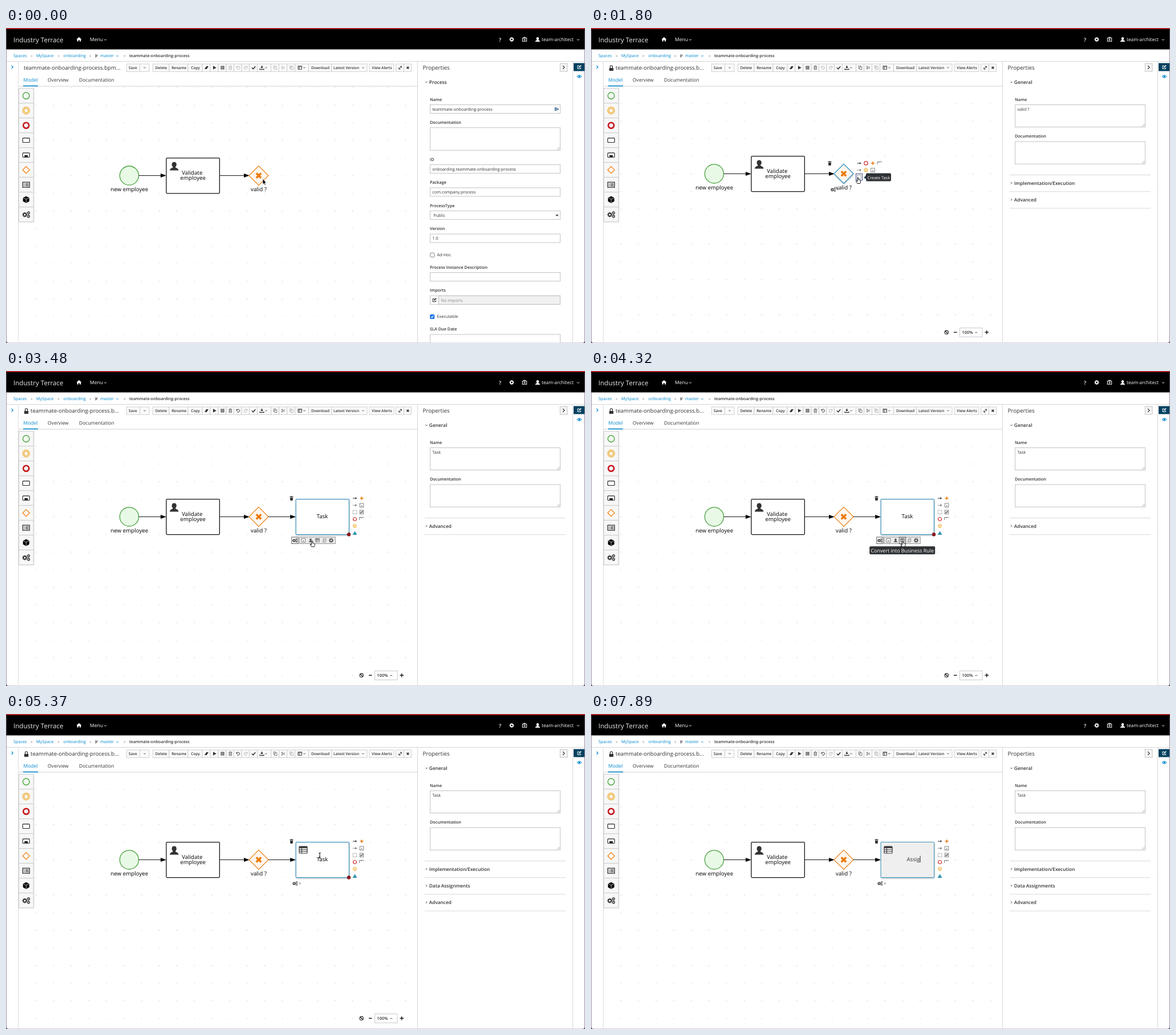
Recreate the animation shown at these times as an HTML page. Size 1015x552 px, loop 8 s.

```html
<!DOCTYPE html>
<html lang="en">
<head>
<meta charset="utf-8">
<title>Process editor</title>
<style>
html, body { margin: 0; width: 100%; height: 100%; overflow: hidden; background: #fff; }
svg { display: block; width: 1015px; height: 552px; font-family: "Open Sans", sans-serif; text-rendering: geometricPrecision; }
</style>
</head>
<body>
<svg id="stage" viewBox="0 0 1015 552" xmlns="http://www.w3.org/2000/svg"></svg>
<script>
const INK = '#333', BLUE = '#0088ce', GREY = '#b5b5b5', ORANGE = '#ec7a08', RED = '#cc2b2b', GOLD = '#eda51c';

// Markup helpers
const text = (x, y, s, size, fill = INK, more = '') =>
  `<text x="${x}" y="${y}" font-size="${size}" fill="${fill}" ${more}>${s}</text>`;
const bold = (x, y, s, size = 7.3, fill = INK, more = '') => text(x, y, s, size, fill, 'font-weight="600" ' + more);
const mid = (x, y, s, size, fill, more = '') => text(x, y, s, size, fill, 'text-anchor="middle" ' + more);
const rect = (x, y, w, h, fill = '#fff', stroke = 'none', more = '') =>
  `<rect x="${x}" y="${y}" width="${w}" height="${h}" fill="${fill}" stroke="${stroke}" ${more}/>`;
const fillPath = (d, fill = INK, more = '') => `<path d="${d}" fill="${fill}" ${more}/>`;
const line = (d, stroke = INK, w = 1, more = '') => `<path d="${d}" fill="none" stroke="${stroke}" stroke-width="${w}" ${more}/>`;
const ring = (x, y, r, stroke, w = 1, fill = 'none') =>
  `<circle cx="${x}" cy="${y}" r="${r}" fill="${fill}" stroke="${stroke}" stroke-width="${w}"/>`;
const group = (id, body, more = '') => `<g id="${id}" ${more}>${body}</g>`;
const at = (x, y, body, scale = 1) => `<g transform="translate(${x} ${y}) scale(${scale})">${body}</g>`;
const chevron = (x, y, dir, color = INK, s = 2, w = 1) => {
  const turn = { right: 0, down: 90, left: 180, up: -90 }[dir];
  return `<path transform="translate(${x} ${y}) rotate(${turn})" d="M${-s / 2} ${-s}L${s / 2} 0L${-s / 2} ${s}" fill="none" stroke="${color}" stroke-width="${w}"/>`;
};

// Icons, centred on 0,0
const gear = c => ring(0, 0, 2.3, c, 1.6) + line('M0-4V-2.6M0 2.6V4M-4 0H-2.6M2.6 0H4M-2.8-2.8L-1.9-1.9M1.9 1.9L2.8 2.8M-2.8 2.8L-1.9 1.9M1.9-1.9L2.8-2.8', c, 1.5);
const gears = c => at(-1.6, 0.3, gear(c), 0.72) + at(2.8, -1.8, gear(c), 0.48) + at(2.8, 2.2, gear(c), 0.48);
const person = c => fillPath('M0-4C3-4 2.6 0 1.1 .8C1.2 1.8 4 1.6 4.2 4H-4.2C-4 1.6-1.2 1.8-1.1 .8C-2.6 0-3-4 0-4Z', c);
const trash = c => fillPath('M-3.2-2H3.2V-3H1.2L.8-4H-.8L-1.2-3H-3.2ZM-2.6-1.3H2.6L2.2 4H-2.2Z', c);
const trashOutline = c => line('M-3-2.2H3M-1-2.4V-3.4H1V-2.4M-2.2-2V3.3H2.2V-2M-.7-.8V2M.7-.8V2', c, .8);
const grid = c => fillPath('M-3-3h1.7v1.7h-1.7zm2.2 0h1.7v1.7h-1.7zm2.2 0h1.7v1.7h-1.7zM-3-.8h1.7v1.7h-1.7zm2.2 0h1.7v1.7h-1.7zm2.2 0h1.7v1.7h-1.7zM-3 1.4h1.7v1.7h-1.7zm2.2 0h1.7v1.7h-1.7zm2.2 0h1.7v1.7h-1.7z', c);
const undo = c => line('M-2-1.2A2.6 2.6 0 1 1-1.6 2', c, 1) + fillPath('M-3.2-3V0H-.3Z', c);
const sheets = c => rect(-2.9, -3, 3.8, 4.4, 'none', c, 'stroke-width=".8"') + rect(-.9, -1.2, 3.8, 4.4, '#fff', c, 'stroke-width=".8"');
const scissors = c => line('M-1.2-1.2L3 2M-1.2 1.2L3-2', c, .9) + ring(-2, -1.8, 1, c, .8) + ring(-2, 1.8, 1, c, .8);
const pencilBox = c => line('M2.5 .6V3H-3V-2.4H.4', c, 1) + line('M-1 1L3.2-3', c, 1.7);
const flow = (c, dash = '') => line('M-3.5 0H2', c, 1.1, dash) + fillPath('M1-2.1L3.8 0L1 2.1Z', c);
const plus = c => line('M-3 0H3M0-3V3', c, 1.5);
const note = () => line('M-4 3V-1.5H4M-1-1.5V.3', '#68737c', .9);
const box = (c, inner = '') => rect(-3.3, -3.3, 6.6, 6.6, '#fff', c, 'stroke-width=".8"') + inner;
const dotBox = () => box('#666', rect(-.8, .2, 1.6, 1.6, '#555'));
const table = c => rect(-7, -6, 14, 12, '#fff', c, 'stroke-width="1.2" rx="1"') + line('M-7-3.2H7M-7-.2H7M-7 2.8H7M-2.6-6V6', c, 1.1) + rect(-7, -6, 14, 2.4, c);
const home = c => fillPath('M0-4L4.6 0H3.2V3.6H1V1H-1V3.6H-3.2V0H-4.6Z', c);
const kit = c => rect(-3.7, -2.3, 7.4, 5.6, 'none', c, 'stroke-width="1"') + line('M-1.5-2.6V-3.8H1.5V-2.6', c, 1) + ring(0, .5, 1.2, c, 1);

function header() {
  const crumbs = [[13, 'Spaces'], [53, 'MySpace'], [100.5, 'onboarding'], [165, 'master']];
  return rect(0, 0, 1015, 552, '#5d4763') + rect(.6, 1, 1013.8, 550.8, '#fff', 'none', 'rx="4"') +
    rect(.6, 1, 1013.8, 36.5, '#000') + rect(0, 0, 1015, 1.8, '#c0282e') +
    text(13, 24.5, 'Industry Terrace', 11.6, '#e8e8e8') +
    at(128, 20, home('#fff')) + text(147, 23, 'Menu', 8.5, '#fff') + chevron(174, 20.5, 'down', '#fff') +
    bold(864, 23.5, '?', 9, '#fff') + at(886.5, 20, gear('#fff')) + at(909, 20, kit('#fff')) +
    at(932, 20, person('#fff')) + text(939, 23, 'team-architect', 8.3, '#fff') + chevron(1003, 20.5, 'down', '#fff') +
    crumbs.map(([x, s]) => text(x, 51.3, s, 7.3, BLUE)).join('') +
    [43, 90, 146, 206].map(x => text(x, 51.3, '»', 7.3, '#888')).join('') +
    line('M157.5 46V51.5M160 46.5V48Q160 49 157.5 50', INK, 1) + chevron(195, 49, 'down', BLUE, 1.8, .9) +
    bold(216, 51.3, 'teammate-onboarding-process', 7.1) +
    line('M1 58.5H1014M721.5 58.5V552M993.5 58.5V552', '#d6d6d6', 1) + line('M21.5 58.5V552', '#dedede', 1) +
    chevron(11, 68.5, 'right', BLUE, 2.6, 1.2) +
    rect(995, 61.5, 19, 14, '#00405f') + at(1005, 68.5, pencilBox('#fff')) +
    line('M1001 85Q1005 80.5 1009 85Q1005 89.5 1001 85Z', BLUE, 1) + ring(1005, 85, 1.2, BLUE, 1, BLUE);
}

function toolbar() {
  const cells = [[212, 23], [235, 16.5], [258, 28.5], [286.5, 33], [319.5, 25], [344.5, 14], [358.5, 14], [372.5, 14],
    [386.5, 13.5], [400, 13.5], [413.5, 13.5], [427, 14], [441, 24], [465, 14], [479, 14], [493, 14], [507, 24],
    [531, 40], [571, 62.5], [637.5, 43], [684, 14], [698, 13]];
  const words = [[222.5, 'Save'], [272, 'Delete'], [303.2, 'Rename'], [332, 'Copy'], [551, 'Download'], [596.5, 'Latest Version'], [659, 'View Alerts']];
  return cells.map(([x, w]) => rect(x - .5, 63, w, 13.3, '#fafafa', '#c6c6c6', 'stroke-width=".8"')).join('') +
    words.map(([x, s]) => mid(x, 72.1, s, 6.6, INK, 'font-weight="600"')).join('') +
    [243, 456, 523, 626].map(x => chevron(x, 69.5, 'down', INK, 1.6, .9)).join('') +
    at(351.5, 69.5, fillPath('M-3.5 2.5L-.3-2.5H3.5L.3 2.5Z')) + fillPath('M363 66.3L368.8 69.5L363 72.7Z') +
    at(379.5, 69.5, grid(INK)) +
    group('offTrash', at(393.3, 69.5, trashOutline(GREY))) + group('onTrash', at(393.3, 69.5, trashOutline('#555'))) +
    group('offUndo', at(406.7, 69.5, undo(GREY))) + group('onUndo', at(406.7, 69.5, undo(INK))) +
    `<g transform="translate(420.3 69.5) scale(-1 1)">${undo(GREY)}</g>` +
    line('M431 69.5L433.3 71.8L437.3 67.2', INK, 1.5) +
    line('M445 71V72.7H452V71', INK, 1.2) + fillPath('M447.7 66H449.3V68.3H451L448.5 71L446 68.3H447.7Z') +
    group('offCopy', at(472, 69.5, sheets(GREY)) + at(486, 69.5, scissors(GREY))) +
    group('onCopy', at(472, 69.5, sheets('#666')) + at(486, 69.5, scissors('#666'))) +
    at(500.3, 69.5, sheets('#aaa')) +
    rect(512, 66.7, 6.5, 5.6, 'none', INK, 'stroke-width=".9"') + line('M512 68H518.5M514.2 68V72.3', INK, .8) +
    line('M689 71.8L693.2 67.4M690.7 67.2H693.4V69.9M688.8 69.3V72H691.5', INK, 1) +
    line('M702.5 67.7L706.3 71.5M706.3 67.7L702.5 71.5', INK, 1.6);
}

function tabs() {
  const file = 'teammate-onboarding-process';
  return group('plainTitle', text(31, 73, file + '.bpm...', 9.6)) +
    group('lockTitle', rect(32, 70, 7.3, 5, INK, 'none', 'rx=".6"') + line('M33.6 70V68A2 2 0 0 1 37.7 68V70', INK, 1.2) + text(43, 73, file + '.b...', 9.6)) +
    line('M22 102H721', '#d1d1d1', 1) + rect(30, 100.7, 26, 1.6, BLUE) +
    text(30.5, 94.2, 'Model', 8.5, BLUE) + text(73, 94.2, 'Overview', 8.5) + text(128, 94.2, 'Documentation', 8.5);
}

function palette() {
  const c = '#222';
  const icons = [
    ring(0, 0, 5.8, '#3f9c35', 1.3, '#f0faee'),
    ring(0, 0, 6, GOLD, 1.2) + ring(0, 0, 3.7, GOLD, 1.2),
    ring(0, 0, 5, '#c4161c', 2.6),
    rect(-6, -3.8, 12, 7.6, '#fff', c, 'stroke-width="1.1" rx="1"'),
    rect(-6, -3.8, 12, 7.6, '#fff', c, 'stroke-width="1.1" rx="1"') + rect(-3, 0, 6, 3.2, c),
    fillPath('M0-6L6 0L0 6L-6 0Z', '#fff8ef', `stroke="${ORANGE}" stroke-width="1.2"`),
    rect(-6, -4.5, 12, 9, '#fff', c, 'stroke-width="1.2"') + line('M-4.3-2H-2.7M-1.4-2H4.4M-4.3 0H-2.7M-1.4 0H4.4M-4.3 2H-2.7M-1.4 2H4.4', c, 1.1),
    fillPath('M0-6L5.5-3.3V3L0 6L-5.5 3V-3.3Z', '#000') + line('M-5-3L0-.6L5-3M0-.6V5.5', '#fff', .7),
    at(0, 0, gears(INK), 1.5)
  ];
  return rect(22, 105.5, 27.5, 235, '#000', 'none', 'opacity=".12" rx="1"') + icons.map((icon, i) =>
    rect(22.5, 105.7 + 26 * i, 25.7, 26, '#f7f7f7', '#c9c9c9', 'stroke-width=".9"') + at(35.3, 118.7 + 26 * i, icon)).join('');
}

const arrow = (x1, x2) => line(`M${x1} 255.4H${x2 - 9}`, '#111', 1) + fillPath(`M${x2 - 10} 251.9L${x2} 255.4L${x2 - 10} 258.9Z`, '#000');
const label = (x, y, s) => mid(x, y, s, 9.75, '#000');
const gateway = (stroke, w) => fillPath('M443 238.4L460 255.4L443 272.4L426 255.4Z', '#fef6ee', `stroke="${stroke}" stroke-width="${w}" stroke-linejoin="round"`);
const tip = (x, y, w, h) => rect(x, y, w, h, '#2f3235', 'none', 'rx="2"');

function diagram() {
  let dots = '';
  for (let j = 0; j < 15; j++) for (let i = 0; i < 22; i++)
    dots += `M${(52 + 30.85 * i).toFixed(1)} ${(101.3 + 30.87 * j).toFixed(1)}h1.1`;
  const nodes =
    ring(216, 255.4, 16.6, '#4aa03f', 1.3, '#e8fae6') + label(216.3, 283, 'new employee') +
    arrow(232.8, 281) + rect(281, 224.6, 93.4, 62, '#fff', '#111', 'rx="1.5" stroke-width="1.3"') +
    at(294.8, 239, person(INK), 1.85) + label(326.3, 253.8, 'Validate') + label(327.8, 262.6, 'employee') +
    arrow(374.5, 427) + group('gateIdle', gateway(ORANGE, 1.2)) +
    group('gateSel', gateway('#1f87c0', 1.2), 'filter="url(#glow)"') +
    line('M438.8 251.2L447.2 259.6M447.2 251.2L438.8 259.6', ORANGE, 3.5) + label(443, 283, 'valid ?');
  const dash = 'stroke-dasharray="1.5 .8"';
  const gateTools = at(418.5, 237, trash(INK)) + at(424.5, 283, gears(INK)) + chevron(433, 282.5, 'right', INK, 1.6, 1) +
    at(470, 237, flow(INK)) + at(482, 237, ring(0, 0, 3.2, RED, 1.2)) + at(494, 237, plus(ORANGE)) + at(506, 236, note()) +
    at(470, 249, flow('#666', dash)) + at(482, 249, ring(0, 0, 3.2, GOLD, 1) + ring(0, 0, 1.5, GOLD, .7)) + at(494, 249, dotBox()) +
    at(470, 261, box('#888')) + fillPath('M482 257.6L485.6 264H478.4Z', '#2f8fae');
  const taskTools = at(500.5, 223, trash(INK)) +
    at(611.5, 223, flow(INK)) + at(623.5, 223, plus(ORANGE)) + at(611.5, 235.3, flow('#666', dash)) + at(623.5, 235.3, dotBox()) +
    at(611.5, 247.3, box('#aaa')) + at(623.5, 247.3, box('#666', line('M-2 2L2-2M-2 0H2', '#555', 1.2))) +
    at(611.5, 259.5, ring(0, 0, 3, RED, 1.2)) + at(623.5, 258, note()) +
    at(611.5, 271.6, ring(0, 0, 3, GOLD, 1) + ring(0, 0, 1.3, GOLD, .7)) + fillPath('M611.5 280.4L615.4 287H607.6Z', '#2f93ae') +
    group('taskGears', at(506.7, 296.8, gears(INK)) + chevron(515.3, 296.8, 'right', INK, 1.6, 1));
  const bar = rect(500.7, 291, 11.6, 11.6, '#f7f7f7', '#555', 'stroke-width=".9"') + at(506.5, 296.8, gears(INK)) +
    rect(514.3, 291, 63, 11.6, '#ececec', '#888', 'stroke-width=".9"') +
    at(521.5, 296.8, dotBox()) + at(534, 296.8, person('#555'), .8) + at(546, 296.8, table('#555'), .5) +
    at(558, 296.8, line('M-2.5 3H2L3-3H-1.5Z', '#888', .9) + line('M-1-1H1.5M-1.5 1H1', '#888', .7)) + at(570, 296.8, gear('#555')) +
    group('ruleFocus', rect(540.3, 291.3, 11.4, 11, 'none', '#444', 'stroke-width=".9"'));
  const frame = more => rect(508.2, 224.6, 93.2, 62, '#fff', '#3f95bd', `rx="1.5" stroke-width="1.2" ${more}`);
  const task = arrow(460, 508.2) + frame('filter="url(#glow)"') +
    group('ruleIcon', at(521, 238, table(INK))) + group('taskLabel', label(554.5, 258.3, 'Task')) +
    group('handle', ring(601, 286.4, 3, '#6d1418', .6, '#93181e')) + taskTools +
    group('editor', rect(508.8, 225.2, 92, 60.8, '#efefef') + at(521, 238, table(INK)) +
      line('M514.7 255.6h1.1M545.5 255.6h1.1M576.4 255.6h1.1', '#c4c4c4', 1) +
      group('marked', rect(555, 248, 20.3, 12.3, '#a9cdf0')) + `<text id="typed" x="565" y="257.8" font-size="9.7" fill="${INK}" text-anchor="middle"></text>` +
      group('caret', rect(576.7, 248.5, .8, 11.6, '#000')));
  return group('canvas', line(dots, '#bdbdbd', 1.1) + nodes) + group('task', task) + group('gateTools', gateTools) +
    group('createTip', rect(464.4, 255.4, 11.4, 11.4, 'none', '#39508c', 'stroke-width="1"') + fillPath('M478.5 261.5L483 258.5V264.5Z', '#2f3235') +
      tip(482, 254.6, 44, 14) + mid(504.3, 264.6, 'Create Task', 7.4, '#fff', 'font-weight="500"')) +
    group('bar', bar) + group('ruleTip', fillPath('M546 303.5L550 308H542Z', '#2f3235') +
      tip(488.2, 307.3, 115, 14) + mid(545.7, 317.5, 'Convert into Business Rule', 8.9, '#fff'));
}

const zoom = () => rect(615, 525, 88, 17.5) + ring(623.2, 533.3, 3.2, '#222', 1.1) + line('M621.2 531.3L625.2 535.3M636 533.3H641.5M690.5 533.3H697M693.7 530V536.6', '#222', 1.5) +
  rect(646.5, 525.6, 39.5, 15.6, '#fff', '#c4c4c4', 'stroke-width=".9"') + bold(650.3, 536, '100%', 7.4) + chevron(675.3, 533.7, 'up', INK, 1.7, 1);

// Properties panel
const field = (y, s, h = 15) => rect(743.5, y, 228, h, '#fff', '#bcbcbc', 'stroke-width=".9"') + text(747.3, y + 10.4, s, 7.3) +
  (h > 20 ? line(`M966 ${y + h - 1}l4.5-4.5M968.5 ${y + h - 1}l2-2`, '#888', .7) : '');
const section = (y, s) => chevron(737, y - 3, 'right', INK, 1.7, .9) + bold(741.8, y, s, 8.25) + line(`M734 ${y + 12}H981`, '#d8d8d8', 1);
const opened = s => chevron(737, 95, 'down', INK, 1.7, .9) + bold(741.8, 97.9, s, 8.4);
const check = (y, s, on) => rect(743.7, y - 3.6, 7.2, 7.2, on ? '#1a73e8' : '#fff', on ? '#1a73e8' : '#777', 'rx="1" stroke-width=".9"') +
  (on ? line(`M745.2 ${y}l1.5 1.7l2.8-3.5`, '#fff', 1.2) : '') + text(755.5, y + 2.6, s, 7.3);

function processForm() {
  const labels = [[127.6, 'Name'], [168, 'Documentation'], [232.6, 'ID'], [273, 'Package'], [313.5, 'ProcessType'], [354, 'Version'],
    [421.6, 'Process Instance Description'], [462.2, 'Imports'], [529.5, 'SLA Due Date']];
  return opened('Process') + labels.map(([y, s]) => bold(743, y, s)).join('') +
    field(134.5, 'teammate-onboarding-process') + line('M962.7 138.7V145.6M965 139.2V145', '#1d4e7a', 1.3) + line('M967.5 140.5V143.8', '#1d4e7a', 1.6) +
    field(174.7, '', 39.6) + field(239.6, 'onboarding.teammate-onboarding-process') + field(280, 'com.company.process') +
    field(320.4, '') + text(749.5, 330.8, 'Public', 7.3) + chevron(966, 328, 'down', '#222', 2, 1.3) + field(361, '1.0') +
    check(397.8, 'Ad-Hoc', false) + field(428.6, '') + field(469.2, '') + rect(758.5, 469.2, 213, 15, '#f1f1f1', '#bcbcbc', 'stroke-width=".9"') +
    at(751, 476.7, pencilBox(INK)) + text(762.5, 479.5, 'No imports', 7.3, '#888') + check(505.8, 'Executable', true) + field(537, '');
}

const nodeForm = (name, sections) => opened('General') + bold(743, 127.6, 'Name') + field(134.5, name, 39) + bold(743, 192, 'Documentation') +
  field(199, '', 39.3) + line('M734 257.5H981', '#d8d8d8', 1) + sections.map((s, i) => section(274.7 + 29.2 * i, s)).join('');

const panel = () => text(730.5, 73, 'Properties', 9.8) + rect(971.3, 62.5, 12.6, 13.5, '#f7f7f7', '#bbb', 'stroke-width=".9"') + chevron(977.6, 69, 'right', INK, 3, 1.1) +
  group('processForm', processForm()) + group('gateForm', nodeForm('valid ?', ['Implementation/Execution', 'Advanced'])) +
  group('taskForm', nodeForm('Task', ['Advanced'])) + group('ruleForm', nodeForm('Task', ['Implementation/Execution', 'Data Assignments', 'Advanced']));

// Pointers have their hot spot on 0,0
const pointers = () => group('pointer',
  group('arrow', fillPath('M0-1V9.2L2.2 7.2L3.8 10.6L5.3 9.9L3.8 6.6H6.6Z', '#000', 'stroke="#fff" stroke-width=".8"')) +
  group('hand', fillPath('M-.9 0Q0-1 .9 0V3.5Q3.8 3.3 4.6 5V7.5L3.5 10H-1L-3.6 6Q-3.3 4.8-.9 6.3Z', '#fff', 'stroke="#000" stroke-width=".9"')) +
  group('move', line('M-4 0H4M0-4V4', '#fff', 3) + line('M-3.5 0H3.5M0-3.5V3.5M-1.2-2.5H1.2M-1.2 2.5H1.2M-2.5-1.2V1.2M2.5-1.2V1.2', '#000', 1.3)) +
  group('beam', line('M-1.9-4.9Q0-4.7 0-3.2Q0-4.7 1.9-4.9M0-4V4.2M-1.9 5Q0 4.8 0 3.3Q0 4.8 1.9 5M-1 1.6H1', '#111', 1)));

const stage = document.getElementById('stage');
stage.innerHTML = '<defs><filter id="glow" x="-20%" y="-20%" width="140%" height="150%"><feDropShadow dx=".5" dy="1.2" stdDeviation=".9" flood-color="#000" flood-opacity=".26"/></filter>' +
  '<clipPath id="area"><rect x="22" y="102.6" width="699" height="449"/></clipPath></defs>' +
  header() + toolbar() + `<g clip-path="url(#area)">${diagram()}${group('zoom', zoom())}</g>` + tabs() + palette() + panel() + pointers();

const el = Object.fromEntries([...stage.querySelectorAll('[id]')].map(n => [n.id, n]));
const show = (id, on) => el[id].setAttribute('opacity', +on);
const fade = (t, a, b) => Math.min(1, Math.max(0, (t - a) / (b - a)));
const ease = p => p * p * (3 - 2 * p);

const route = [[0, 450, 265], [1560, 450, 265], [1770, 468, 262.5], [2370, 468, 262.5], [2850, 525, 287], [3120, 508, 298],
  [3240, 508, 298], [3600, 546.5, 298], [4560, 546.5, 298], [5160, 550, 248]];
const shapes = [[0, 'arrow'], [1680, 'hand'], [2070, 'arrow'], [2580, 'move'], [3030, 'hand'], [4560, 'arrow'], [4950, 'beam'], [7050, '']];
const typing = [[0, 'Task'], [7050, 'A'], [7320, 'As'], [7440, 'Ass'], [7560, 'Assi'], [7830, 'Assig']];
const current = (list, t) => list.filter(k => k[0] <= t).pop()[1];

function place(t) {
  const i = route.findIndex(k => k[0] > t);
  if (i < 0) return route[route.length - 1].slice(1);
  const [t0, x0, y0] = route[i - 1], [t1, x1, y1] = route[i], p = ease(fade(t, t0, t1));
  return [x0 + (x1 - x0) * p, y0 + (y1 - y0) * p];
}

function draw(t) {
  const picked = t >= 720, made = t >= 2010, ruled = t >= 4590, editing = t >= 5520, typed = t >= 7050;
  const gateSel = picked && !made, barOpen = t >= 3150 && t < 4560;
  el.canvas.setAttribute('transform', `translate(0 ${picked ? 0 : 3.2})`);
  show('plainTitle', t < 1410); show('lockTitle', t >= 1410);
  show('offTrash', !picked); show('onTrash', picked);
  show('offCopy', !picked); show('onCopy', picked);
  show('offUndo', !made); show('onUndo', made);
  show('gateIdle', !gateSel); show('gateSel', gateSel);
  show('gateTools', gateSel ? fade(t, 750, 1020) : 0);
  show('createTip', t >= 1740 && !made);
  show('task', made ? fade(t, 1980, 2130) : 0);
  show('taskGears', !barOpen); show('bar', barOpen ? fade(t, 3150, 3270) : 0);
  show('ruleFocus', t >= 3540); show('ruleTip', t >= 3540 && t < 4560);
  show('ruleIcon', ruled);
  show('taskLabel', !editing); show('handle', !editing);
  show('editor', editing ? fade(t, 5490, 5700) : 0);
  show('marked', t >= 5700 && !typed);
  el.typed.textContent = current(typing, t);
  el.typed.setAttribute('fill', typed ? INK : '#34485c');
  show('caret', typed);
  if (typed) el.caret.setAttribute('transform', `translate(${el.typed.getComputedTextLength() / 2 - 11.6} 0)`);
  show('zoom', picked ? fade(t, 690, 840) * (1 - fade(t, 5850, 6060)) : 0);
  show('processForm', t < 1020); show('gateForm', t >= 1020 && t < 2250);
  show('taskForm', t >= 2250 && t < 4800); show('ruleForm', t >= 4800);
  const kind = current(shapes, t);
  for (const id of ['arrow', 'hand', 'move', 'beam']) show(id, id === kind);
  el.pointer.setAttribute('transform', `translate(${place(t).join(' ')})`);
}

const start = performance.now();
function tick() {
  draw((performance.now() - start) % 8000);
  requestAnimationFrame(tick);
}
tick();
</script>
</body>
</html>
```
